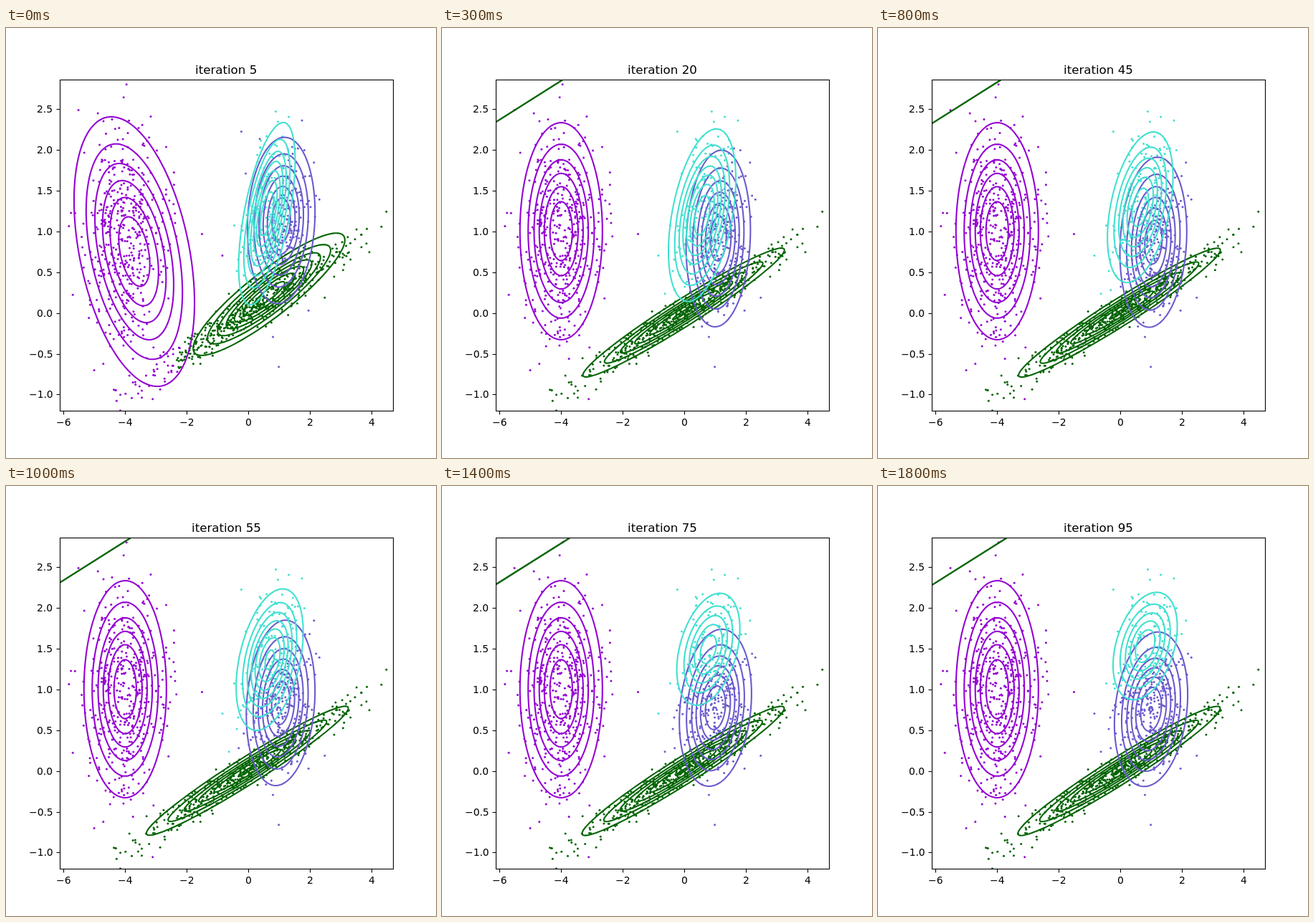
An HTML page with a canvas that plays this animation: 600 by 600 pixels, repeating every 1.9 s.

```html
<!DOCTYPE html>
<html lang="en">
<head>
<meta charset="utf-8">
<title>Mixture fit</title>
<style>
html, body { margin: 0; width: 100%; height: 100%; overflow: hidden; background: #fff; }
canvas { display: block; width: 600px; height: 600px; }
</style>
</head>
<body>
<canvas id="plot" width="600" height="600"></canvas>
<script>
const ctx = document.getElementById('plot').getContext('2d');
const STEP = 100, STEPS = 19, TAU = Math.PI * 2;
const BOX = { l: 75.5, t: 72.5, w: 465, h: 462 };
const UNIT = { x: 43, y: 113.85 };
const GREEN = '#006400';

// Each pose: centre x, centre y, deviation x, deviation y, correlation.
// A part moves quickly from the first pose to the second, then drifts to the last.
const parts = [
  { color: '#9400d3', weight: 1, poses: [
    [179, 312, 42.9, 96, 0.38],
    [166.3, 283.5, 29.25, 77, 0]] },
  { color: GREEN, weight: 1.2, poses: [
    [367, 371.5, 52.5, 42.3, -0.888],
    [337.2, 397, 73.8, 47.2, -0.97],
    [336.3, 397.6, 74.4, 47.5, -0.97]] },
  { color: '#6a5acd', weight: 0.7, poses: [
    [384, 268.5, 24, 59, -0.1],
    [385.5, 293.7, 22.95, 63, -0.1],
    [381, 311.5, 25.9, 54.6, -0.19]] },
  { color: '#40e0d0', weight: 0.55, poses: [
    [364, 259, 19.4, 62.6, -0.58],
    [363, 261.2, 23.2, 59.4, -0.42],
    [372.8, 223.3, 23.8, 39.8, -0.36]] }
];

const clamp = t => Math.min(1, Math.max(0, t));
const settle = k => 1 - (1 - clamp(k / 3)) ** 2;
const drift = k => { const t = clamp((k - 3) / 14); return t * t * (3 - 2 * t); };
const mix = (a, b, t) => a + (b - a) * t;

function seeded(s) {
  return () => {
    s = (s + 0x6D2B79F5) | 0;
    let t = Math.imul(s ^ (s >>> 15), 1 | s);
    t = (t + Math.imul(t ^ (t >>> 7), 61 | t)) ^ t;
    return ((t ^ (t >>> 14)) >>> 0) / 4294967296;
  };
}

// Maps a standard normal coordinate to the plot
function place([cx, cy, sx, sy, rho], r, angle) {
  const u = r * Math.cos(angle), v = r * Math.sin(angle);
  return [cx + sx * u, cy + sy * (rho * u + Math.sqrt(1 - rho * rho) * v)];
}

const rand = seeded(27);
const cloud = (count, pose) => Array.from({ length: count }, () =>
  place(pose, Math.sqrt(-2 * Math.log(1 - rand())), rand() * TAU));

const dots = [
  ...cloud(450, parts[0].poses[1]),
  ...cloud(480, parts[1].poses[2]),
  ...cloud(370, [379, 283, 25, 64, -0.05])
];

function fit({ color, weight, poses }, k) {
  const [a, b, c = b] = poses;
  const pose = a.map((v, i) => mix(mix(v, b[i], settle(k)), c[i], drift(k)));
  const [cx, cy, sx, sy, rho] = pose;
  const q = Math.sqrt(1 - rho * rho);
  const peak = UNIT.x * UNIT.y / (TAU * sx * sy * q);
  const density = (x, y) => {
    const u = (x - cx) / sx, v = ((y - cy) / sy - rho * u) / q;
    return weight * peak * Math.exp(-(u * u + v * v) / 2);
  };
  return { color, pose, peak, density };
}

function drawDots(fits) {
  for (const [x, y] of dots) {
    const score = fits.map(f => f.density(x, y));
    ctx.fillStyle = fits[score.indexOf(Math.max(...score))].color;
    ctx.beginPath();
    ctx.arc(x, y, 1.5, 0, TAU);
    ctx.fill();
  }
}

// Smallest round step that gives at most eight intervals
function roundStep(peak) {
  const raw = peak / 8, base = 10 ** Math.floor(Math.log10(raw));
  return base * [1, 1.5, 2, 2.5, 3, 4, 5, 6, 8, 10].find(m => m * base >= raw);
}

function drawContours({ color, pose, peak }) {
  const gap = roundStep(peak);
  ctx.strokeStyle = color;
  for (let level = gap; level < peak; level += gap) {
    const r = Math.sqrt(2 * Math.log(peak / level));
    ctx.beginPath();
    for (let i = 0; i < 120; i++) ctx.lineTo(...place(pose, r, i * TAU / 120));
    ctx.closePath();
    ctx.stroke();
  }
}

function line(x1, y1, x2, y2) {
  ctx.beginPath();
  ctx.moveTo(x1, y1);
  ctx.lineTo(x2, y2);
  ctx.stroke();
}

// Text starts on a whole pixel; anchor is 0.5 for centred, 1 for right-aligned
function label(text, x, y, anchor, size) {
  text = text.replace('-', '\u2212');
  ctx.font = size + 'px "DejaVu Sans", sans-serif';
  ctx.fillText(text, Math.round(x - anchor * ctx.measureText(text).width), y);
}

function drawAxes(k) {
  const bottom = BOX.t + BOX.h;
  ctx.strokeStyle = ctx.fillStyle = '#000';
  ctx.lineWidth = 1.1;
  ctx.strokeRect(BOX.l, BOX.t, BOX.w, BOX.h);
  for (let v = -6; v <= 4; v += 2) {
    const x = 338 + UNIT.x * v;
    line(x + 0.5, bottom, x + 0.5, bottom + 5);
    label(String(v), x, 555, 0.5, 13.89);
  }
  for (let v = -1; v <= 2.5; v += 0.5) {
    const y = Math.round(397.6 - UNIT.y * v);
    line(BOX.l - 5, y + 0.5, BOX.l, y + 0.5);
    label(v.toFixed(1), 65.3, y + 5, 1, 13.89);
  }
  label('iteration ' + (5 + 5 * k), 307.5, 64, 0.5, 16.67);
}

function draw(k) {
  ctx.fillStyle = '#fff';
  ctx.fillRect(0, 0, 600, 600);
  const fits = parts.map(p => fit(p, k));
  ctx.save();
  ctx.beginPath();
  ctx.rect(BOX.l, BOX.t, BOX.w, BOX.h);
  ctx.clip();
  drawDots(fits);
  ctx.lineWidth = 2.08;
  fits.forEach(drawContours);
  if (k > 0) {
    // a collapsed component, seen as a thin sliver
    ctx.strokeStyle = GREEN;
    ctx.lineWidth = 2.4;
    line(BOX.l, mix(131, 138, drift(k)), mix(168, 179.5, drift(k)), BOX.t);
  }
  ctx.restore();
  drawAxes(k);
}

const start = performance.now();
let shown = -1;
function tick() {
  const k = Math.floor((performance.now() - start) / STEP) % STEPS;
  if (k !== shown) draw(shown = k);
  requestAnimationFrame(tick);
}
tick();
</script>
</body>
</html>
```
